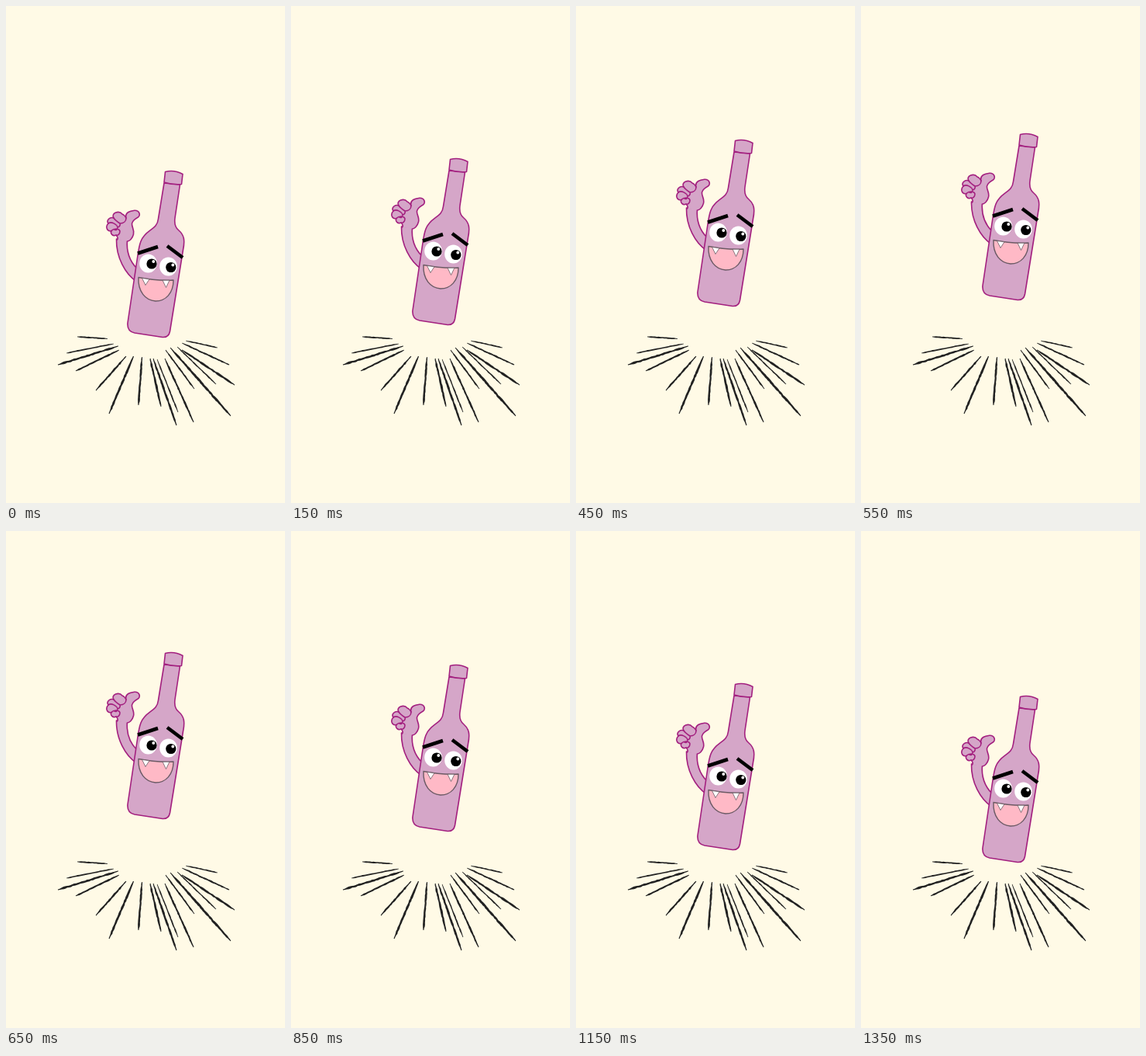
These frames come from a looping animation (360 by 640 pixels, 1.4 s). An HTML page:

```html
<!DOCTYPE html>
<html lang="en">
<head>
<meta charset="utf-8">
<title>Jumping bottle</title>
<style>
  html, body { margin: 0; width: 100%; height: 100%; overflow: hidden; background: #fffae6; }
  svg { display: block; width: 360px; height: 640px; }
  .skin { fill: #d5a6c8; stroke: #a3207f; stroke-width: 1.6; stroke-linejoin: round; stroke-linecap: round; }
  .line { fill: none; }
  .brow { fill: none; stroke: #000; stroke-width: 4.6; }
  .mouth { fill: #ffb9c6; stroke: #6b5a64; stroke-width: 1.4; stroke-linejoin: round; }
  .tooth { fill: #fff; stroke: #6b5a64; stroke-width: .8; }
  .white { fill: #fff; }
</style>
</head>
<body>
<svg viewBox="0 0 360 640">
  <path id="rays" fill="#222"/>
  <g id="bottle">
    <g class="skin">
      <path d="M142.5 300C142 324 154 345 168 354.500L169 338C160 329 155 317 156.500 301Z"/>
      <path d="M143.500 301C145 299 144 297 142 295C138 297 134 293 136 289.500C130 291 128 284 132 280C129 276 134 271 139 273C135 266 146 263 150 268C153 269 154 271 155 273C153 265 161 264 166 263.300C172 263 174 269 170.500 272C167 274 164 275 162.500 280C162 285 166 288 164.500 294C163 300 159 303 156.500 303"/>
      <path class="line" d="M139 273C141 276 144 278 147 280C152 280 155 277 155 273M132 280C136 277 143 281 144 285C144 288 142 289 140 288M136 289.500C139 286 146 286 147 290C147 294 144 296 142 295M147 280C148 282 146 285 144 285"/>
      <path d="M204 228L196.500 274C195 289 180 287 174 303C172 308 171 314 170 321L157 408Q156 419 166 421L202 426.500Q210 427 211.500 419L228.500 314C231 302 230 295 223 289C218 285 217 280 218 273L224.500 230Z"/>
      <path d="M205.500 213.500Q217 210.500 228 216.500L226.500 229.500Q215 230.500 204 227Z"/>
    </g>
    <path class="brow" d="M170 318.500L196 310M208 309L228 324"/>
    <ellipse class="white" cx="183.500" cy="331.500" rx="11.300" ry="12"/>
    <ellipse class="white" cx="209.500" cy="335.500" rx="11.300" ry="12"/>
    <circle cx="188" cy="332" r="6.600"/>
    <circle cx="212.800" cy="336.500" r="6.600"/>
    <circle class="white" cx="190.300" cy="329" r="1.900"/>
    <circle class="white" cx="215.300" cy="333.500" r="1.900"/>
    <path class="mouth" d="M171 349.500Q193 354 216 353C216 370 206 380 193 380C180 379 170 368 171 349.500Z"/>
    <path class="tooth" d="M175.500 350.400L180 359.500L185 351.800ZM202 353.200L206.500 362.500L211 353.200Z"/>
  </g>
</svg>
<script>
// Each stroke: inner x, y, outer x, y, width
const strokes = [
  [131, 428.5, 92, 426, 1.7], [139, 435, 78, 447, 1.7], [145, 438, 67, 462, 2.5],
  [146, 443, 90, 470, 2.1], [155, 451, 116, 495, 2.3], [164.5, 451, 133, 525, 2.5],
  [175.5, 452, 171, 514, 2.4], [186, 454, 200, 516, 2.5], [190, 454, 220, 540, 2.4],
  [195, 455, 222, 523, 1.6], [205, 454, 242, 536, 2.2], [206, 443, 243, 493, 1.8],
  [212, 440, 290, 528, 2.7], [221, 439, 271, 487, 1.6], [227, 443, 295, 488, 2.5],
  [227, 434, 288, 462, 1.9], [232, 431, 273, 440, 1.6]
];

let seed = 7;
const random = () => (seed = seed * 16807 % 2147483647) / 2147483647;

// A tapered brush stroke with rough edges
function roughStroke([x1, y1, x2, y2, width]) {
  const dx = x2 - x1, dy = y2 - y1, length = Math.hypot(dx, dy);
  const steps = Math.round(length / 2.5), left = [], right = [];
  for (let i = 0; i <= steps; i++) {
    const u = i / steps, taper = Math.min(1, 0.4 + 4 * u, 0.4 + 6 * (1 - u));
    const edge = side => {
      const d = side * width / 2 * taper * (0.7 + 0.6 * random()) / length;
      return `${(x1 + dx * u - dy * d).toFixed(2)} ${(y1 + dy * u + dx * d).toFixed(2)}`;
    };
    left.push(edge(1));
    right.unshift(edge(-1));
  }
  return `M${left.concat(right).join("L")}Z`;
}

document.getElementById("rays").setAttribute("d", strokes.map(roughStroke).join(""));

const bottle = document.getElementById("bottle");
const start = performance.now();

function draw(now) {
  const time = Math.max(0, now - start) % 1400;
  const step = Math.floor((time + 50) / 100);
  const height = 8 * (7 - Math.abs(7 - step));
  bottle.setAttribute("transform", `translate(0 ${-height})`);
  requestAnimationFrame(draw);
}
draw(start);
</script>
</body>
</html>
```
